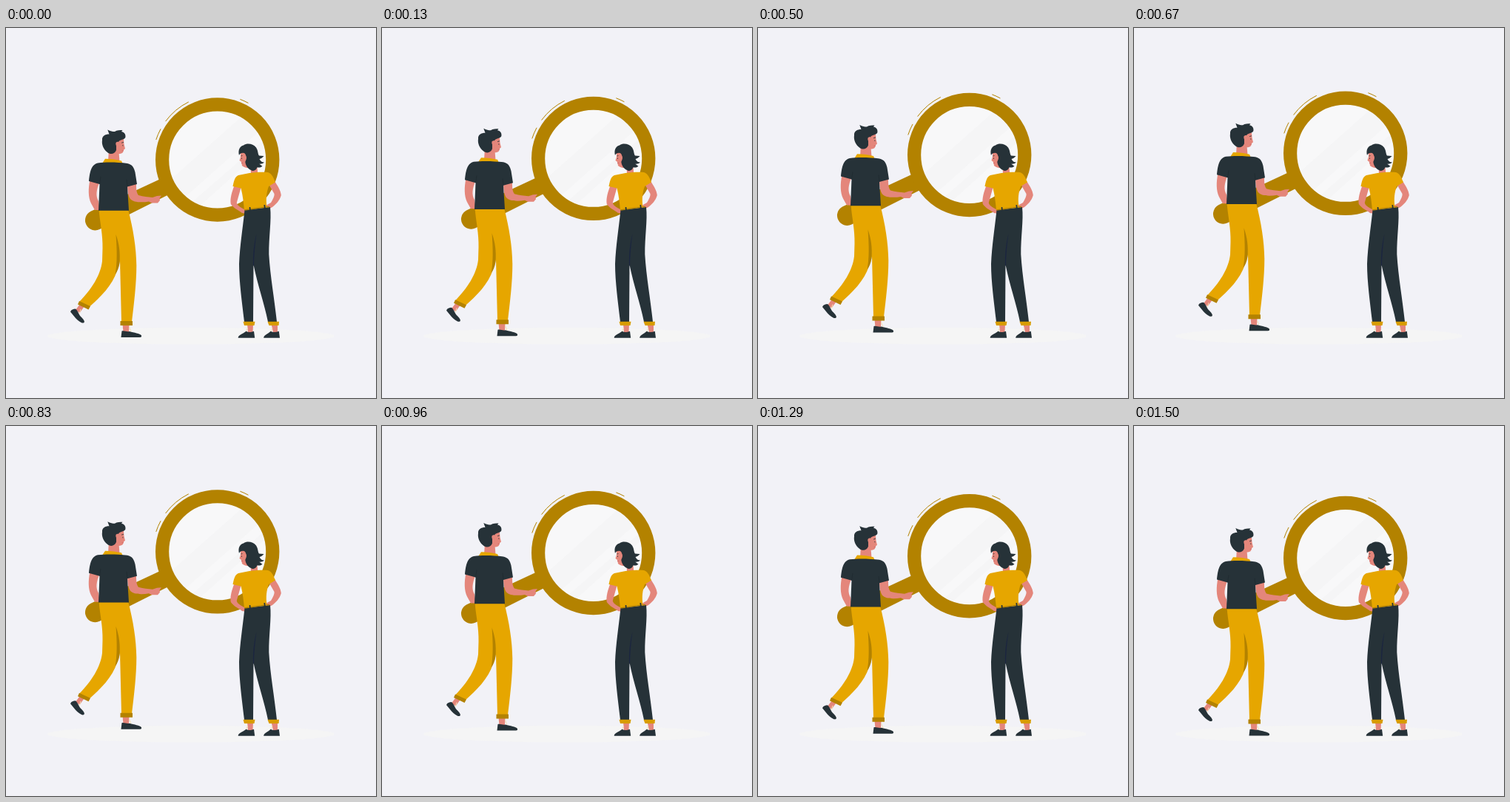
Recreate the animation shown at these times as an HTML page with a canvas. Size 500 by 500 pixels, loop 1540 ms.

```html
<!DOCTYPE html>
<html lang="en">
<head>
<meta charset="utf-8">
<title>Magnifier</title>
<style>
html, body { margin: 0; width: 100%; height: 100%; overflow: hidden; background: #f2f2f7; }
canvas { display: block; width: 500px; height: 500px; }
</style>
</head>
<body>
<canvas></canvas>
<script>
const canvas = document.querySelector('canvas');
const ctx = canvas.getContext('2d');
const ratio = window.devicePixelRatio || 1;
canvas.width = canvas.height = 500 * ratio;

const LOOP = 1540, STEPS = 37, LIFT = 10;
const DARK = '#263238', GOLD = '#e6a600', BROWN = '#b38200', SKIN = '#e4867b',
      BLUSH = '#c95f62', NAVY = '#1b2540', CREAM = '#f6e3b4', CUFF = '#d89c00';
const LENS = { x: 285.7, y: 178, r: 74.6, width: 18.2 };

const fill = (color, d) => { ctx.fillStyle = color; ctx.fill(new Path2D(d)); };
const line = (color, width, d) => {
  ctx.strokeStyle = color;
  ctx.lineWidth = width;
  ctx.stroke(new Path2D(d));
};
const arc = (r, from, to) => {
  ctx.beginPath();
  ctx.arc(LENS.x, LENS.y, r, from * Math.PI / 180, to * Math.PI / 180);
};

function drawGround() {
  ctx.fillStyle = '#f5f5f5';
  ctx.beginPath();
  ctx.ellipse(250, 416.2, 193.9, 11.3, 0, 0, 7);
  ctx.fill();
}

function drawMagnifier() {
  fill(BROWN, 'M114.5 247.8 L214 201.5 L222 224 L126.5 272 A13 13 0 1 1 114.5 247.8Z');

  ctx.save();
  arc(LENS.r, 0, 360);
  ctx.fillStyle = '#f8f8f9';
  ctx.fill();
  ctx.clip();
  fill('#f5f5f6', 'M220 207 L318 120 L344 138 L238 232Z M247 239 L352 148 L356 156 L256 246Z');
  ctx.restore();

  ctx.strokeStyle = BROWN;
  ctx.lineWidth = LENS.width;
  arc(LENS.r, 0, 360);
  ctx.stroke();

  ctx.lineWidth = 1;
  for (const [from, to] of [[198, 208.5], [216.5, 243.5], [290.6, 298.6]]) {
    arc(87.2, from, to);
    ctx.stroke();
  }
}

function drawMan() {
  // far arm
  fill(SKIN, 'M113.5 205 C111 217 111 229 115 237 L120 246 L127 246 L125 234 C121 227 122 219 126.5 208Z');

  // feet
  fill(SKIN, 'M100 373 L94 381 L99.5 385 L106 376Z M157.5 400 L158.5 411 L166 411 L166.5 400Z');
  line(CREAM, 1, 'M101 380 L99 386 M166.5 404 L169 410');
  fill(DARK, 'M87 383.5 C88 380.5 91 379.5 94 379.5 C98 383 98 387 101 390 C104 393 107 396 105.5 398 C103 400 98 396 94 392Z');
  fill(DARK, 'M155.5 418 L156.5 409.5 C160 408.5 163 411 167 410 C173 412 181 412.5 183 415.5 Q183.5 418 181 418Z');

  // trousers
  fill(GOLD, 'M125.5 245 C127 264 131 279 130.5 298 L130 315 C128 334 115 354 99 370 L112.5 377 C127 364 144 348 150 328 L154 315 L156 397 L170 397 C173 372 176.3 345 176.3 321 C176 297 172 272 165 245Z');
  fill(BROWN, 'M148.5 279 C153 292 154.5 303 153.5 318 Q152 327 147.5 333 C150.5 318 150 300 148.5 279Z');
  fill(BROWN, 'M99 369 L114 376 L111.5 380.5 L97 373.5Z M154.5 396 H171 V402 H154.5Z');

  // near arm
  fill(SKIN, 'M164 210 L176 210 C176 217 176 222 179 226 C186 228 192 228 198 229 L204 227 L210 226.5 L207.5 230 L208 233 L205 236.5 L197 236.5 L193 234.5 C184 236 172 236 168 231 C165 227 164 219 164 210Z');

  // neck, collar and shirt
  fill(SKIN, 'M139 164 L152.5 168 L153.5 180 L138 180Z');
  fill(GOLD, 'M130 183 L134 176.8 C142 177 150 178 156 179.5 L158 184Z');
  fill(DARK, 'M124 182.5 C136 181 151 181.5 164 183 C171 184.5 173 189 174.5 195 L177 211 L164 214.5 L166 246.7 H125 L126.5 211 L112 207 C113 197 114.5 184.5 124 182.5Z');
  line('#1d272c', .6, 'M126.5 211 L128 201 M164 214 L163 205');

  // head
  fill(SKIN, 'M147 150 L159 150 L159.5 157 L161 163 L159.2 164.5 L158 168 C156 170.5 151 170.5 147 169Z');
  fill(DARK, 'M137 168 C132 164 129 158 130 151.5 C129.5 146 134 143.5 139.5 143.5 L137.3 137.5 C141 139.5 144 140 147 140 C150 138 154 138 157.5 138 L156 140 C161 141 162 145 161.3 148 C159 152 154 150 152 154 C149 153 148 156 149 159 L149 165 C147 170.5 141 171.5 137 168Z');
  fill(SKIN, 'M148.5 155 C151 153 153 156 152 160 C151 163 148.5 161 148.5 155Z');
  line(DARK, .8, 'M156 155.3 L159 154.4 M157.8 158 V159.5');
  line(BLUSH, .6, 'M156.5 166 L159 165.8');
}

function drawWoman() {
  // arms
  fill(SKIN, 'M308.5 213 C305.5 221 302.5 230 303.8 238 C308 244 314 246 319 250 L325 251 L325 246.5 L319 243.5 C315 241 312 239 311.8 236 L318 214Z');
  fill(SKIN, 'M355 211 L363 207 C367 213 371.5 220 371.8 226 C370 233 365 238 360 242 L354 245 L351 240 L358 236 C361 231 363 227 362.5 224Z');

  // feet
  fill(SKIN, 'M326 400 L327 411 L333.5 411 L334 400Z M358.5 400 L361 411 L367 411 L367 400Z');
  line(CREAM, 1, 'M326.5 405 L324.5 410 M360 405 L358 410');
  fill(DARK, 'M313.7 418.8 C313.5 415 320 413.5 324.5 409.8 C328 411.7 331 411 335 409.7 L336.2 418.8Z');
  fill(DARK, 'M348.2 418.8 C348.2 415 354 413.7 357.7 409.8 C361 411.7 365 411 368.8 409.7 L370 418.8Z');

  // trousers
  fill(DARK, 'M322.5 246 L357 242 C359 260 355 282 355.3 306 C357 335 363 368 366 397 L354 397 C349 372 340 347 334.5 320 L334 397 L322 397 C319 371 315 343 315 319 C316 294 320 270 322.5 246Z');
  fill(NAVY, 'M338.5 278 C335 292 333.5 305 334 320 L335 322 C335 307 336.5 292 338.5 278Z');
  fill(CUFF, 'M320.5 396.7 H336.5 L335.5 402 H322Z M353.5 396.7 H369 L368.5 402 H355.5Z');

  // neck and top
  fill(SKIN, 'M330.5 184 L339 184 L340.5 198 L331 198Z');
  fill(GOLD, 'M329 196 C338 195 347 194.5 354 195 C360 197 362 204 364 208.5 L355 214 C352 222 351 231 352.5 241.5 L322 246 C321 236 320 226 317.5 216.5 L306.5 214 C308 207 309 201 314 199Z');
  line(BROWN, 1.5, 'M322.5 246 Q338 243.5 356 241.5');
  line(DARK, 1.7, 'M329.5 242 L330 248 M349.3 239 L350 245');

  // head
  fill(SKIN, 'M317 167 L326 168 L331 189 C326 190 321 188 319 186 L318 181 L315.5 179 L317 174Z');
  fill(DARK, 'M315 172 C313 164 317 159 321 158.5 C326 155 334 156.5 338 161.5 C341 166 340 170 342 172.5 L348.5 173 C346.5 175.5 344.5 176.5 342.5 177 C344 180 346 181.5 349 181.5 C347 183.5 344 184 342 183.5 L346.5 186.7 C344.5 188.5 341.5 189 339.5 188.3 C338 192 335 194 332 192.5 C328 191 324 187 323.3 181 C325 176 325 171 322 169 Q317 168 315 172Z');
  fill(SKIN, 'M322 173 C325 171 326 176 323.5 180Z');
  line(DARK, .8, 'M317.5 173 L319.5 172.5 M318.5 175.5 V177');
  line(BLUSH, .8, 'M318 182.5 L320 182.5');
}

function draw(time) {
  // linear bob, sampled at the animation's 24 steps per second
  const step = Math.floor(((time + 5) % LOOP) / LOOP * STEPS);
  const phase = (step + 1) / STEPS;
  const lift = LIFT * (1 - Math.abs(1 - 2 * phase));

  ctx.setTransform(ratio, 0, 0, ratio, 0, 0);
  ctx.fillStyle = '#f2f2f7';
  ctx.fillRect(0, 0, 500, 500);
  drawGround();
  ctx.save();
  ctx.translate(0, .5 - lift);
  drawMagnifier();
  drawMan();
  ctx.restore();
  drawWoman();
}

function tick() {
  draw(performance.now());
  requestAnimationFrame(tick);
}
tick();
</script>
</body>
</html>
```
